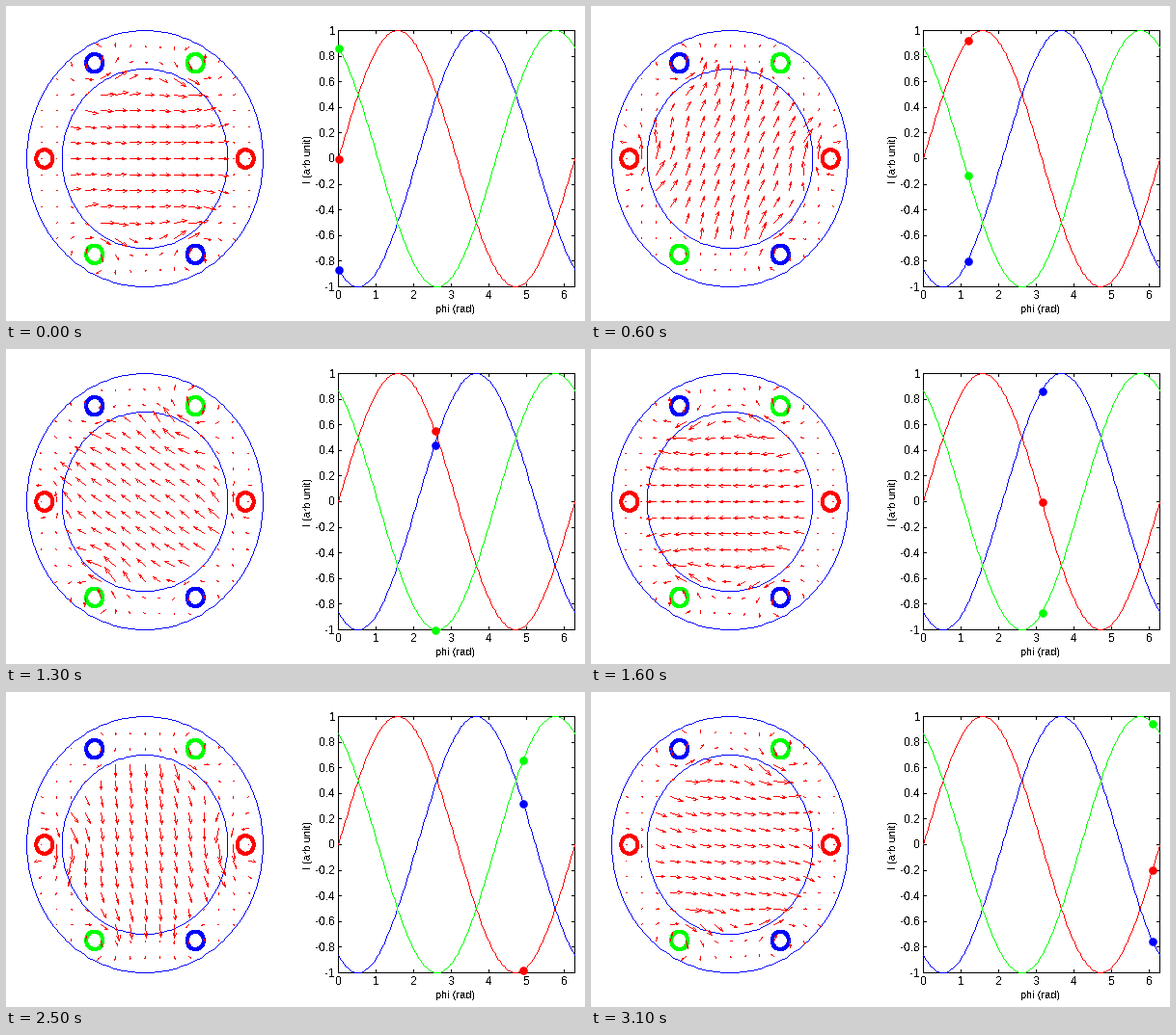
A matplotlib script that plays this animation: 600x327 px, repeating every 3200 ms.

```python
import numpy as np
import matplotlib.pyplot as plt
from matplotlib.animation import FuncAnimation
from matplotlib.patches import Ellipse

W, H, DPI = 600, 327, 100
FRAMES, STEP = 32, 100
PX = 72 / DPI                       # one pixel in points
RED, GREEN, BLUE = "#ff0000", "#00ff00", "#0000ff"

plt.rcParams["font.family"] = "Liberation Sans"
plt.rcParams["text.antialiased"] = False
plt.rcParams["path.simplify"] = False

fig = plt.figure(figsize=(W / DPI, H / DPI), dpi=DPI, facecolor="white")
ax = fig.add_axes([0, 0, 1, 1])
ax.set_xlim(-0.5, W - 0.5)
ax.set_ylim(H - 0.5, -0.5)
ax.axis("off")


# ---- crisp lines, one whole pixel wide ----
def snap(p):
    return np.floor(np.asarray(p) + 0.5)


def stamp(start, end):
    """Pixel dashes that cover straight segments; points are (n, 2)."""
    start, end = snap(start), snap(end)
    count = np.abs(end - start).max(axis=1).astype(int) + 1
    seg = np.repeat(np.arange(len(count)), count)
    step = np.arange(len(seg)) - (np.cumsum(count) - count)[seg]
    t = step / np.maximum(count - 1, 1)[seg]
    x, y = snap(start[seg] + (end - start)[seg] * t[:, None]).T
    gap = np.full_like(x, np.nan)
    return (np.column_stack([x - 0.5, x + 0.5, gap]).ravel(),
            np.column_stack([y, y, gap]).ravel())


def crisp(color):
    line, = ax.plot([], [], color=color, lw=PX, solid_capstyle="butt",
                    snap=False)
    return line


def trace(xs, ys, color="black"):
    points = np.column_stack([xs, ys])
    crisp(color).set_data(*stamp(points[:-1], points[1:]))


# ---- machine cross section, in units of the outer radius ----
CX, CY, RX, RY = 143.5, 158, 122.5, 133
BORE, COIL = 0.7, 0.07
MIRROR = 0.75                       # strength of the mirror currents
AIR_GAIN, IRON_GAIN = 0.0152, 0.009

# position, phase shift, current direction, colour
THIRD = 2 * np.pi / 3
COILS = [
    (-0.85, 0.0, 0, 1, RED), (0.85, 0.0, 0, -1, RED),
    (-0.427, 0.747, -THIRD, -1, BLUE), (0.427, -0.747, -THIRD, 1, BLUE),
    (0.427, 0.747, THIRD, 1, GREEN), (-0.427, -0.747, THIRD, -1, GREEN),
]
angle = np.linspace(0, 2 * np.pi, 201)


def place(x, y):
    return np.column_stack([CX + RX * x, CY - RY * y])


def swirl(x, y, x0, y0, core):
    """Field of a unit current at (x0, y0), softened inside its core."""
    dx, dy = x - x0, y - y0
    d2 = np.maximum(dx ** 2 + dy ** 2, core ** 2)
    return np.array([-dy / d2, dx / d2])


ticks = np.linspace(-1, 1, 17)
gx, gy = (g.ravel() for g in np.meshgrid(ticks, ticks))
keep = np.hypot(gx, gy) < 1
gx, gy = gx[keep], gy[keep]
inside = np.hypot(gx, gy) < BORE

PARTS = []
for x0, y0, shift, sign, _ in COILS:
    flip = BORE ** 2 / (x0 ** 2 + y0 ** 2)
    direct = swirl(gx, gy, x0, y0, 0.09)
    image = swirl(gx, gy, x0 * flip, y0 * flip, 0.01)
    PARTS.append(sign * np.where(inside, AIR_GAIN * (1 + MIRROR) * direct,
                                 IRON_GAIN * (direct - MIRROR * image)))


def arrows(phi):
    """Shafts and open heads of the whole field."""
    u, v = sum(np.sin(phi + c[2]) * p for c, p in zip(COILS, PARTS))
    tx, ty = gx + u, gy + v
    a = b = 0.33
    tip = place(tx, ty)
    left = place(tx - a * (u + b * v), ty - a * (v - b * u))
    right = place(tx - a * (u - b * v), ty - a * (v + b * u))
    return stamp(np.vstack([place(gx, gy), left, right]),
                 np.vstack([tip, tip, tip]))


for r in (1, BORE):
    trace(*place(r * np.cos(angle), r * np.sin(angle)).T, BLUE)
for x0, y0, _, _, color in COILS:
    ax.add_patch(Ellipse((CX + RX * x0, CY - RY * y0), 2 * RX * COIL,
                         2 * RY * COIL, fill=False, ec=color, lw=3 * PX,
                         antialiased=False))
field = crisp(RED)

# ---- current chart ----
LEFT, RIGHT, TOP, BOTTOM = 344, 589, 25, 291
MID, AMP = (TOP + BOTTOM) / 2, (BOTTOM - TOP) / 2


def chart_x(phi):
    return LEFT + (RIGHT - LEFT) * phi / (2 * np.pi)


def chart_y(value):
    return MID - AMP * value


def label(x, y, text, size=12, **kw):
    ax.text(x, y, text, fontsize=size * PX, **kw)


trace([LEFT, RIGHT, RIGHT, LEFT, LEFT], [TOP, TOP, BOTTOM, BOTTOM, TOP])
for n in range(7):
    x = chart_x(n)
    trace([x, x], [BOTTOM, BOTTOM - 3])
    trace([x, x], [TOP, TOP + 3])
    label(x, 304, str(n), ha="center", va="baseline")
for n in range(-5, 6):
    y = chart_y(n / 5)
    trace([LEFT, LEFT + 3], [y, y])
    trace([RIGHT, RIGHT - 3], [y, y])
    label(LEFT - 3, y + 4, f"{n / 5:g}", ha="right", va="baseline")
label(465, 317, "phi (rad)", 11, ha="center", va="baseline")
label(312, MID, "I (arb unit)", 11, ha="center", va="center", rotation=90)

PHASES = [(0, RED), (-THIRD, BLUE), (THIRD, GREEN)]
dots = []
for shift, color in PHASES:
    trace(chart_x(angle), chart_y(np.sin(angle + shift)), color)
    dots += ax.plot([], [], "o", color=color, ms=8.6 * PX, mew=0, zorder=5)


def draw(n):
    phi = 2 * np.pi * n / FRAMES
    field.set_data(*arrows(phi))
    for dot, (shift, _) in zip(dots, PHASES):
        dot.set_data([snap(chart_x(phi))],
                     [snap(chart_y(np.sin(phi + shift)))])
    return [field, *dots]


anim = FuncAnimation(fig, draw, frames=FRAMES, interval=STEP,
                     repeat=True, repeat_delay=0, blit=False)
plt.show()
```
